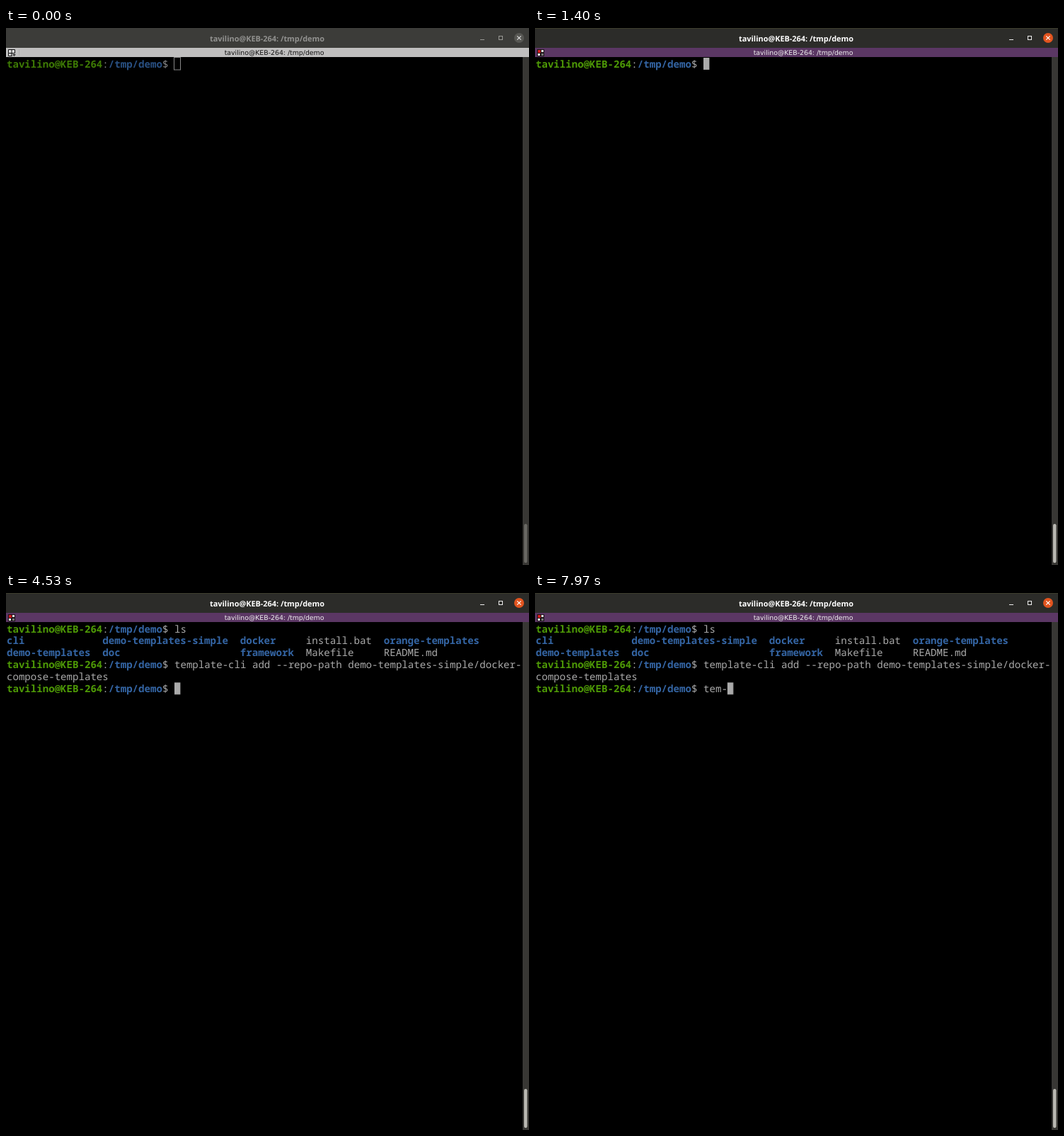
Recreate the animation shown at these times as an HTML page. Size 739 px wide and 758 px high, loop 8 s.

```html
<!DOCTYPE html>
<html lang="en">
<head>
<meta charset="utf-8">
<title>Terminal demo</title>
<style>
  html, body { margin: 0; width: 100%; height: 100%; overflow: hidden; background: #000; }
  svg { display: block; --w: 8.464px; --h: 16.87px; }
  text { white-space: pre; text-rendering: geometricPrecision; }
  .mono { font: 14.107px "Noto Sans Mono", "DejaVu Sans Mono", monospace; fill: #aaa; }
  .user, .dir { font-weight: 700; }
  .user { fill: #4e9a06; }
  .dir { fill: #3465a4; }
  .title { font: 700 10.9px "Open Sans", "Noto Sans", sans-serif; text-anchor: middle; }
  .tab { font: 9.33px "DejaVu Sans", sans-serif; text-anchor: middle; }

  /* One loop is 8 s, so 1% is 80 ms; almost every change is a hard cut. */
  .a { animation: 8s step-end infinite; }
  .idle { animation-name: idle; }
  .live { animation-name: live; }
  .dim { animation-name: dim; }
  .k1 { animation-name: k1; }
  .k2 { animation-name: k2; }
  .list { animation-name: list; }
  .cmd { animation-name: cmd; }
  .again { animation-name: again; }
  .k3 { animation-name: k3; }
  .k4 { animation-name: k4; }
  .k5 { animation-name: k5; }
  .k6 { animation-name: k6; }
  .move { animation-name: move; }
  .blink { animation-name: blink; }
  .seen { animation-name: seen; }
  .thumb { animation: thumb 8s linear infinite; }
  .glide { animation: glide 8s ease-in-out infinite; }

  @keyframes idle { 0% { visibility: visible } 8%, to { visibility: hidden } }
  @keyframes live { 0% { visibility: hidden } 8%, to { visibility: visible } }
  @keyframes dim { 0% { opacity: .8 } 8%, to { opacity: 1 } }
  @keyframes thumb { 0%, 8.375% { fill: #696863 } 10.875%, to { fill: #b9b8b2 } }
  @keyframes k1 { 0% { visibility: hidden } 18.75%, to { visibility: visible } }
  @keyframes k2 { 0% { visibility: hidden } 20.5%, to { visibility: visible } }
  @keyframes list { 0% { visibility: hidden } 23.75%, to { visibility: visible } }
  @keyframes cmd { 0% { visibility: hidden } 45.375%, to { visibility: visible } }
  @keyframes again { 0% { visibility: hidden } 56.25%, to { visibility: visible } }
  @keyframes k3 { 0% { visibility: hidden } 75.375%, to { visibility: visible } }
  @keyframes k4 { 0% { visibility: hidden } 78.75%, to { visibility: visible } }
  @keyframes k5 { 0% { visibility: hidden } 81.625%, to { visibility: visible } }
  @keyframes k6 { 0% { visibility: hidden } 95.375%, to { visibility: visible } }
  @keyframes seen { 0%, 10.875%, to { visibility: hidden } .375% { visibility: visible } }
  @keyframes glide {
    0%, .375% { transform: translate(232px, -6px) }
    7.5%, to { transform: translate(292px, 200.5px) }
  }
  @keyframes move {
    0% { transform: translate(calc(28 * var(--w)), 0px) }
    18.75% { transform: translate(calc(29 * var(--w)), 0px) }
    20.5% { transform: translate(calc(30 * var(--w)), 0px) }
    23.75% { transform: translate(calc(28 * var(--w)), calc(3 * var(--h))) }
    45.375% { transform: translate(0px, calc(5 * var(--h))) }
    56.25% { transform: translate(calc(28 * var(--w)), calc(5 * var(--h))) }
    75.375% { transform: translate(calc(29 * var(--w)), calc(5 * var(--h))) }
    78.75% { transform: translate(calc(30 * var(--w)), calc(5 * var(--h))) }
    81.625% { transform: translate(calc(31 * var(--w)), calc(5 * var(--h))) }
    95.375%, to { transform: translate(calc(32 * var(--w)), calc(5 * var(--h))) }
  }
  @keyframes blink {
    0%, 31.25%, 52.875%, 63.75%, 90.875% { opacity: 0 }
    8%, 38.375%, 56.25%, 71.25%, 95.375%, to { opacity: 1 }
  }
</style>
</head>
<body>
<svg width="739" height="758" viewBox="0 0 739 758">
  <defs>
    <text id="prompt" class="mono" x="1" y="55.5"><tspan class="user">tavilino@KEB-264</tspan>:<tspan class="dir">/tmp/demo</tspan>$</text>
    <g id="controls" fill="none">
      <path d="M670 16.5h6"/>
      <rect x="696.5" y="11.5" width="5" height="5"/>
    </g>
    <path id="cross" d="M722.3 11.3l5.4 5.4m0-5.4l-5.4 5.4" stroke-width="1.2"/>
  </defs>
  <rect width="739" height="758"/>

  <!-- Window without focus -->
  <g class="a idle">
    <rect width="739" height="28" fill="#3c3c39"/>
    <rect y="28" width="739" height="13" fill="#c0bfbf"/>
    <text class="title" x="369" y="18.5" fill="#929290">tavilino@KEB-264: /tmp/demo</text>
    <text class="tab" x="379" y="37.6" fill="#111">tavilino@KEB-264: /tmp/demo</text>
    <use href="#controls" stroke="#989894"/>
    <circle cx="725" cy="14" r="7" fill="#575753"/>
    <use href="#cross" stroke="#ddd"/>
    <path d="M3.5 30.5h9v5h-9zM8 30.5v9M3.5 35.5v4h5M10 37.5h3l-1.5 2z" fill="#ddd" stroke="#111"/>
    <path d="M18.5 30v9" stroke="#b0b0b0"/>
    <rect x="237.5" y="41.5" width="9" height="17.5" fill="none" stroke="#888"/>
  </g>

  <!-- Window with focus -->
  <g class="a live">
    <rect width="739" height="28" fill="#2c2c29"/>
    <rect width="739" height="1" fill="#3b3c2c"/>
    <rect y="28" width="739" height="13" fill="#5b3764"/>
    <text class="title" x="369" y="18.5" fill="#fff">tavilino@KEB-264: /tmp/demo</text>
    <text class="tab" x="379" y="37.6" fill="#eee">tavilino@KEB-264: /tmp/demo</text>
    <use href="#controls" stroke="#eee"/>
    <circle cx="725" cy="14" r="7" fill="#e2541f"/>
    <use href="#cross" stroke="#fff"/>
    <rect x="3" y="30" width="10" height="10" fill="#1c1418"/>
    <rect x="4" y="31" width="4" height="4" fill="#d01c1c"/>
    <path d="M9 31h3v3h-3zM4 36h3v3h-3z" fill="#eee"/>
    <path d="M9 36h3v3h-3z" fill="#777"/>
  </g>

  <rect x="730" y="41" width="9" height="717" fill="#383734"/>
  <rect class="thumb" x="732" y="700" width="4.5" height="55" rx="2.2"/>

  <use class="a dim" href="#prompt"/>
  <text class="mono" x="238" y="55.5"><tspan class="a k1">l</tspan><tspan class="a k2">s</tspan></text>

  <g class="a list">
    <text class="mono" x="1" y="72.4"><tspan class="dir">cli             demo-templates-simple  docker</tspan>     install.bat  <tspan class="dir">orange-templates</tspan></text>
    <text class="mono" x="1" y="89.2"><tspan class="dir">demo-templates  doc                    framework</tspan>  Makefile     README.md</text>
    <use href="#prompt" y="50.6"/>
  </g>

  <g class="a cmd">
    <text class="mono" x="238" y="106.1">template-cli add --repo-path demo-templates-simple/docker-</text>
    <text class="mono" x="1" y="123">compose-templates</text>
  </g>

  <use class="a again" href="#prompt" y="84.4"/>
  <text class="mono" x="238" y="139.9"><tspan class="a k3">t</tspan><tspan class="a k4">e</tspan><tspan class="a k5">m</tspan><tspan class="a k6">-</tspan></text>

  <g class="a move">
    <rect class="a blink" x="1" y="42" width="8.4" height="16.9" fill="#aaa"/>
  </g>

  <!-- Mouse pointer -->
  <g class="a seen">
    <g class="glide" fill="none">
      <path d="M-3 -6h6M0 -6v12M-3 6h6" stroke="#ddd" stroke-width="3"/>
      <path d="M-3 -6h6M0 -6v12M-3 6h6" stroke="#222"/>
    </g>
  </g>
</svg>
</body>
</html>
```
